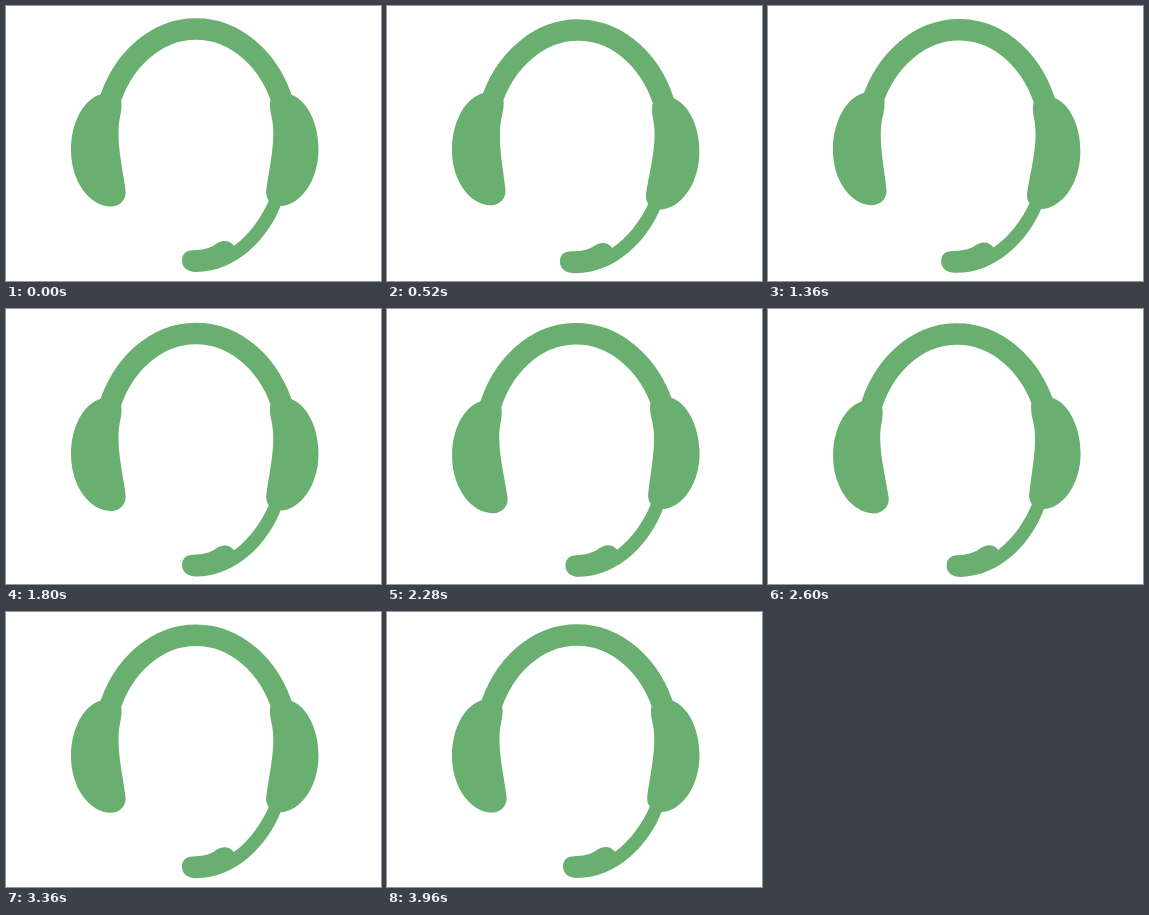
Recreate the animation shown at these times as an HTML page. Size 375 by 275 pixels, loop 4 s.

```html
<!DOCTYPE html>
<html lang="en">
<head>
<meta charset="utf-8">
<title>Headset</title>
<style>
  html, body { margin: 0; width: 100%; height: 100%; overflow: hidden; background: #fff; }
  svg { display: block; width: 100vw; height: 100vh; }
</style>
</head>
<body>
<svg viewBox="0 0 375 275" fill="#69b070" stroke-linecap="round">
  <g id="headset">
    <g id="ticks" stroke="#69b070"></g>
    <path d="M102.2 100A93 115 0 0 1 277.8 100" fill="none" stroke="#69b070" stroke-width="21.5" stroke-linecap="butt"/>
    <path d="M95 88.3C78 93 65 116 65 144C65 176 84 200.5 105 200.5C114 200.5 121 193 119.5 184C117 165 112.5 146 112.5 127C112.5 112 116 108 115.5 97C115 88 105 84.5 95 88.3Z"/>
    <path d="M285 88.5C300.5 94 312.5 116 312.5 143.5C312.5 175.5 293.5 200 274 200C265 200 259 193 260.3 184C262.8 165 267.3 146 267.3 127C267.3 112 263.5 108 264 97C264.5 89 275 85 285 88.5Z"/>
    <path d="M275 199C262 233 230 266 190 266C181 266 176 261 176 254.5C176 248 180 244.3 187 244.2C196 244 203 242.5 208.5 239C215 234 223 233 228 239.8C244 228 256 211 264 192Z"/>
  </g>
</svg>
<script>
const LOOP = 4000, STEP = 40;
const PIVOT = { x: 188.5, y: 140 };
const GREEN_TICK = { reach: 149.5, spread: 30, level: 135.5, rise: 34 };
const BURST = { peak: 1000, period: 1400, before: 80, after: 120, speed: 0.15 };

// [time, value] turning points
const TILT = [[0, 0], [840, 2.25], [2480, -1.35], [3560, 0.15], [LOOP, 0]];
const BOB = [[0, 0], [960, 2], [1400, 0.8], [2100, 1.9], [2800, 2.1], [3520, 0], [LOOP, 0]];

const headset = document.getElementById("headset");
const tickGroup = document.getElementById("ticks");

function makeTick(side, row) {
  const line = document.createElementNS("http://www.w3.org/2000/svg", "line");
  const half = side < 0 ? 4 : 4.8;
  line.setAttribute("x1", -half);
  line.setAttribute("x2", half);
  line.setAttribute("stroke-width", side < 0 ? 11.8 : 9.8);
  tickGroup.append(line);
  return { line, side, row };
}

const ticks = [-1, 1].flatMap(side => [-1, 0, 1].map(row => makeTick(side, row)));

// Sine easing from one turning point to the next
function sample(keys, t) {
  const i = keys.findIndex(([time]) => time > t);
  const [t0, v0] = keys[i - 1], [t1, v1] = keys[i];
  const ease = (1 - Math.cos(Math.PI * (t - t0) / (t1 - t0))) / 2;
  return v0 + (v1 - v0) * ease;
}

function drawTicks(t) {
  const n = Math.max(0, Math.round((t - BURST.peak) / BURST.period));
  const age = t - BURST.peak - n * BURST.period;
  const visible = age >= -BURST.before && age <= BURST.after;
  tickGroup.setAttribute("visibility", visible ? "visible" : "hidden");
  if (!visible) return;

  const { reach, spread, level, rise } = GREEN_TICK;
  const out = age * BURST.speed;
  for (const { line, side, row } of ticks) {
    const angle = row * spread;
    const rad = angle * Math.PI / 180;
    const x = PIVOT.x + side * (reach - 6 * Math.abs(row) + out * Math.cos(rad));
    const y = level + row * rise + out * Math.sin(rad);
    line.setAttribute("transform", `translate(${x} ${y}) rotate(${side * angle})`);
  }
}

function draw(now) {
  const t = Math.floor((now % LOOP) / STEP) * STEP;
  headset.setAttribute("transform",
    `translate(0 ${sample(BOB, t)}) rotate(${sample(TILT, t)} ${PIVOT.x} ${PIVOT.y})`);
  drawTicks(t);
}

const start = performance.now();
function frame() {
  draw(performance.now() - start);
  requestAnimationFrame(frame);
}
frame();
</script>
</body>
</html>
```
